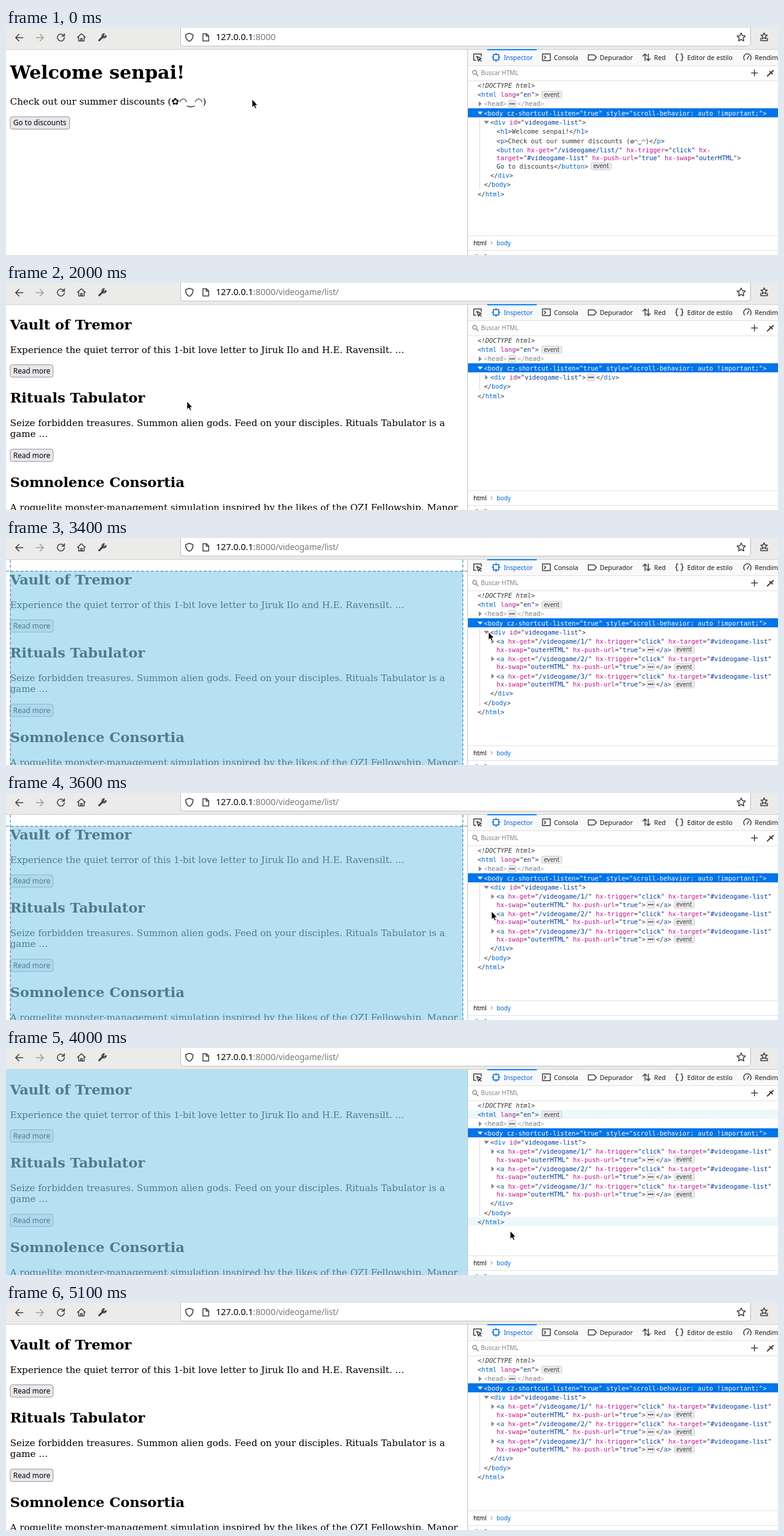
Write an HTML page that moves like this. It is 1280x376 px and loops after 5700 ms.

```html
<!DOCTYPE html>
<html lang="en">
<head>
<meta charset="utf-8">
<title>Browser with inspector</title>
<style>
  html, body { margin: 0; width: 100%; height: 100%; overflow: hidden; background: #fff; }
  svg { display: block; width: 100%; height: 100%; }
  text { white-space: pre; }
  .page { font-family: "DejaVu Serif", "DejaVu Sans", serif; font-size: 15.3px; }
  .h1 { font-size: 30.6px; font-weight: bold; }
  .h2 { font-size: 22.95px; font-weight: bold; }
  .ui, .button { font-family: "Noto Sans", sans-serif; }
  .button { font-size: 12px; }
  .url { font-size: 14.6px; }
  .path { font-size: 13.6px; }
  .tab { font-size: 10.7px; }
  .small { font-size: 10px; }
  .code { font-family: "DejaVu Sans Mono", monospace; font-size: 10.52px; fill: #38383d; }
  .tag { fill: #0067d1; }
  .attr { fill: #c0128f; }
  .val { fill: #003a9b; }
  .selected, .selected tspan { fill: #fff; }
  .faded { fill: #a0a0a5; }
  .faded tspan { fill: #77777c; }
  .doctype { font-style: italic; }
  .icon { fill: none; stroke: #3c3c43; stroke-width: 1.5; stroke-linejoin: round; stroke-linecap: round; }
  .guide { fill: none; stroke: #2b7ba3; stroke-dasharray: 5 3; }
</style>
</head>
<body>
<svg id="stage" viewBox="0 0 1280 376" preserveAspectRatio="none"></svg>
<script>
const LOOP = 5700;
const ROW = 15.3, WRAP = 13.4, FIRST_ROW = 95, CHAR = 6.333;

const text = (x, y, s, cls = '') => `<text x="${x}" y="${y}" class="${cls}">${s}</text>`;
const rect = (x, y, w, h, fill, more = '') =>
  `<rect x="${x}" y="${y}" width="${w}" height="${h}" fill="${fill}" ${more}/>`;
const icon = (d, style = '') => `<path class="icon" d="${d}" style="${style}"/>`;
const group = (id, content) => `<g id="${id}">${content}</g>`;

// ---- Web page ----
const button = (y, w, label, id = '') =>
  rect(7, y, w, 20.5, '#e9e9ed', `id="${id}" rx="3.5" stroke="#8f8f9d"`) +
  text(12, y + 14.4, label, 'button');

const home = text(6.8, 84, 'Welcome senpai!', 'h1') +
  text(6.8, 127, 'Check out our summer discounts (✿◠‿◠)') +
  button(147, 98.5, 'Go to discounts', 'go');

const list = text(6.8, 76.5, 'Vault of Tremor', 'h2') +
  text(6.8, 115.7, 'Experience the quiet terror of this 1-bit love letter to Jiruk Ilo and H.E. Ravensilt. …') +
  button(135.5, 71, 'Read more') +
  text(6.8, 198.2, 'Rituals Tabulator', 'h2') +
  text(6.8, 237.2, 'Seize forbidden treasures. Summon alien gods. Feed on your disciples. Rituals Tabulator is a') +
  text(6.8, 255.2, 'game …') +
  button(275.2, 71, 'Read more') +
  text(6.8, 338, 'Somnolence Consortia', 'h2') +
  text(6.8, 376.7, 'A roguelite monster-management simulation inspired by the likes of the QZJ Fellowship, Manor');

// ---- Element highlighter ----
const guides = '<path class="guide" d="M0 55H765M7.2 36V376M757.5 36V376"/>';
const content = rect(7, 55, 750.5, 321, '#87ceeb', 'opacity=".6"');
const margins = '<path fill="#edff64" opacity=".6" d="M0 47H765V376H757.5V55H7V376H0Z"/>';
const overlays = {
  body: margins + content + guides,
  div: content + guides,
  html: rect(0, 36, 765, 340, '#87ceeb', 'opacity=".6"')
};

// ---- Browser toolbar ----
const star = (cx, cy, r) => 'M' + Array.from({ length: 10 }, (_, i) => {
  const a = (i * 36 - 90) * Math.PI / 180, d = i % 2 ? r * 0.48 : r;
  return `${(cx + d * Math.cos(a)).toFixed(1)} ${(cy + d * Math.sin(a)).toFixed(1)}`;
}).join('L') + 'Z';

const toolbar = rect(0, 0, 1280, 35, '#ebebea') + rect(0, 35, 1280, 1, '#cfcfd2') +
  rect(289.5, -6, 945, 36, '#fff', 'rx="4" stroke="#bcbcc0"') +
  icon('M28 16H16M21.5 10.5L16 16l5.5 5.5') +
  icon('M50 16H62M56.5 10.5L62 16l-5.5 5.5', 'opacity:.45') +
  icon('M95.6 12.2A5.8 5.8 0 1 0 96.8 16M96.8 9.5V13.5H92.5') +
  icon('M118.5 15.5L125 9.5l6.5 6M120.5 14.5V21.5H129.5V14.5M123.7 21.5V17.5H126.3V21.5') +
  icon('M154.5 20.5L161 14', 'stroke-width:3') +
  icon('M163 9.5a3.5 3.5 0 1 0 3 3l-2.8 1.8-2-2Z') +
  icon('M304 8.8L310 11C310.5 17 307.5 20.5 304 22C300.5 20.5 297.5 17 298 11Z') +
  icon('M326.5 9.5H332.5L336 13V21.5H326.5ZM332 9.5V13.5H336') +
  icon(star(1219, 15.5, 7.3)) +
  icon(star(1257, 13.5, 5.5)) + icon('M1251.5 17V21H1262.5V17') +
  `<g class="ui">${text(348, 20, '127.0.0.1<tspan fill="#77777d">:8000</tspan>', 'url')}` +
  `<g id="path" fill="#77777d">${text(447, 20, '/videogame/list/', 'path')}</g></g>`;

// ---- Developer tools ----
const tab = (x, label, color = '#18181a') => `<g fill="${color}">${text(x, 52.5, label, 'tab')}</g>`;

const panel = rect(765, 36, 515, 340, '#fff') + rect(765, 36, 515, 26, '#f9f9fa') +
  [62, 87, 343.5, 368].map(y => rect(765, y, 515, 1, '#e0e0e2')).join('') +
  rect(765, 36, 1, 340, '#c5c5ca') +
  rect(798, 35, 82, 2, '#0a84ff') +
  icon('M779 53.5H775.5V43H788V47M780.5 47L788 50.5 784.8 51.5 783.5 55ZM785 52L788 55') +
  icon('M808 44H817V53H808ZM812.5 42V44M812.5 53V55.5M806 48.5H808M817 48.5H819', 'stroke:#0067d1') +
  icon('M889.5 43H902.5V54H889.5ZM892.5 46.5L895 48.7 892.5 51') +
  icon('M965.5 44.5H975L979 48.7 975 53H965.5Z') +
  icon('M1059.5 54V43M1056 46.5L1059.5 43 1062.5 46M1065 43V54M1061.8 51L1065 54 1068 51') +
  icon('M1114 43C1109.5 43 1113.5 48 1110.5 48.5C1113.5 49 1109.5 54 1114 54M1119 43C1123.5 43 1119.5 48 1122.5 48.5C1119.5 49 1123.5 54 1119 54') +
  icon('M1224.5 53A6.2 6.2 0 1 1 1234 53M1229 51.5L1231.5 46.5') +
  icon('M1236 74.5H1246M1241 69.5V79.5') +
  icon('M1262.5 79.5L1268 74M1266.5 72L1270.5 76M1269.5 73L1272 70.5', 'stroke-width:2') +
  icon('M780.3 73.5a3.3 3.3 0 1 0 -6.6 0a3.3 3.3 0 1 0 6.6 0M779.5 76L783 79.5', 'stroke:#77777d;stroke-width:1.2') +
  '<g class="ui">' +
  tab(825.5, 'Inspector', '#0060df') + tab(908.5, 'Consola') + tab(984.5, 'Depurador') +
  tab(1074.5, 'Red') + tab(1129.5, 'Editor de estilo') + tab(1241.5, 'Rendimiento') +
  `<g fill="#808086">${text(787.5, 78.3, 'Buscar HTML', 'small')}</g>` +
  text(775, 359.7, 'html', 'small') + `<g fill="#0067d1">${text(813.5, 359.7, 'body', 'small')}</g></g>` +
  icon('M804 353.5L806.5 356 804 358.5', 'stroke-width:1;stroke:#77777d') +
  rect(779, 375, 3, 1, '#77777d') + rect(793, 375, 4, 1, '#77777d');

// ---- Markup tree: "·" is a collapsed badge, "@" an event badge ----
const colorize = s => s.replace(/(<\/?)(\w+)|([\w-]+)="([^"]*)"|(hx-$)|>/g,
  (m, open, tag, attr, val, cut) => {
    if (tag) return `${open.replace('<', '&lt;')}<tspan class="tag">${tag}</tspan>`;
    if (attr) return `<tspan class="attr">${attr}</tspan>="<tspan class="val">${val}</tspan>"`;
    return cut ? `<tspan class="attr">${cut}</tspan>` : '&gt;';
  });

function badge(x, y, w, label) {
  const box = rect(x, y - 5.7, w, 11.6, '#ececef', 'rx="2" stroke="#c4c4ca" stroke-width=".8"');
  return box + (label ? `<g class="ui" fill="#38383d">${text(x + 3.5, y + 3.3, label, 'small')}</g>`
    : [3, 6.2, 9.4].map(dx => `<circle cx="${x + dx}" cy="${y}" r="1.2" fill="#38383d"/>`).join(''));
}

function codeLine(x, y, source, cls) {
  return source.split(/([·@])/).map(part => {
    const start = x;
    if (part === '·') { x += 17.4; return badge(start + 2.5, y, 12.4); }
    if (part === '@') { x += 40; return badge(start + 4.8, y, 33.5, 'event'); }
    x += part.length * CHAR;
    return part && text(start, y + 3.8, colorize(part), 'code ' + cls);
  }).join('');
}

function arrow(x, y, kind, color) {
  const d = kind === 'v' ? 'm-4.3 -2.5h8.6l-4.3 5.2Z' : 'm-2.3 -4.3v8.6l4.8 -4.3Z';
  return `<path fill="${color}" d="M${x} ${y}${d}"/>`;
}

const rowBand = (y, color) => rect(766, Math.round(y - 7.9), 514, 15, color);

// Each row: [depth, arrow, lines, class]
const head = [
  [0, '', ['&lt;!DOCTYPE html>'], 'doctype'],
  [0, '', ['<html lang="en">@']],
  [1, '>', ['<head>·</head>'], 'faded'],
  [1, 'v', ['<body cz-shortcut-listen="true" style="scroll-behavior: auto !important;">'], 'selected']
];
const tail = [[1, '', ['</body>']], [0, '', ['</html>']]];

function tree(rows) {
  let y = FIRST_ROW, out = '', lineEnd = 0;
  for (const [depth, kind, lines, cls = ''] of [...head, ...rows, ...tail]) {
    const x = 782 + depth * 10.45;
    if (cls === 'selected') out += rowBand(y, '#0074e8');
    if (kind) out += arrow(x - 6.3, y, kind, cls === 'selected' ? '#fff' : '#85858b');
    lines.forEach((line, i) => out += codeLine(x, y + i * WRAP, line, cls));
    y += (lines.length - 1) * WRAP + ROW;
    if (depth) lineEnd = y - 9;
  }
  return rect(785, 149, 1, lineEnd - 149, '#d9d9dd') + out;
}

const openDiv = [2, 'v', ['<div id="videogame-list">']], closeDiv = [2, '', ['</div>']];
const trees = {
  home: tree([openDiv,
    [3, '', ['<h1>Welcome senpai!</h1>']],
    [3, '', ['<p>Check out our summer discounts (✿◠‿◠)</p>']],
    [3, '', ['<button hx-get="/videogame/list/" hx-trigger="click" hx-',
      'target="#videogame-list" hx-push-url="true" hx-swap="outerHTML">',
      'Go to discounts</button>@']],
    closeDiv]),
  folded: tree([[2, '>', ['<div id="videogame-list">·</div>']]]),
  open: tree([openDiv,
    ...[1, 2, 3].map(n => [3, '>', [
      `<a hx-get="/videogame/${n}/" hx-trigger="click" hx-target="#videogame-list"`,
      'hx-swap="outerHTML" hx-push-url="true">·</a>@']]),
    closeDiv])
};
const hoverRows = { body: [171.5], div: [156.2], html: [110.3, 288.2] };

const groups = (prefix, map, render = x => x) =>
  Object.entries(map).map(([key, value]) => group(`${prefix}-${key}`, render(value))).join('');

document.getElementById('stage').innerHTML =
  rect(0, 0, 1280, 376, '#fff') +
  `<g class="page">${groups('page', { home, list })}</g>` +
  groups('overlay', overlays) + toolbar + panel +
  groups('hover', hoverRows, ys => ys.map(y => rowBand(y, '#edf8fb')).join('')) +
  groups('tree', trees) +
  '<path id="cursor" fill="#000" stroke="#fff" stroke-width=".9" d="M0 0V13.5L3 10.8 5.2 15.4 7.4 14.4 5.3 10H9.3Z"/>';

// ---- Timeline: [start in ms, value...], each held until the next ----
const cursorSteps = [
  [0, 408, 118], [300, 400, 123], [400, 391.5, 127],
  [600, 330, 139], [700, 205, 158], [800, 104, 169], [900, 78, 165],
  [2000, 300, 196], [2100, 640, 215],
  [2300, 836.5, 147], [2400, 823, 150], [2500, 812, 153], [2600, 804, 155], [2700, 800, 155.5],
  [3500, 801, 166], [3600, 805, 196], [3700, 811, 241], [3800, 818.5, 273],
  [3900, 823, 287], [4000, 836, 303], [4100, 860, 319], [4200, 885, 331], [4300, 903, 336], [4400, 911, 335],
  [4800, 907, 333], [4900, 900.5, 330.5], [5000, 888, 362], [5100, -50, -50]
];
const pageSteps = [[0, 'home'], [1600, 'list']];
const treeSteps = [[0, 'home'], [2000, 'folded'], [3400, 'open']];
const overlaySteps = [[0, ''], [2300, 'body'], [2500, 'div'], [3800, 'html'], [4900, '']];
const hoverSteps = [[0, ''], [2300, 'body'], [2500, 'div'], [3400, ''], [3800, 'html'], [5100, '']];
const buttonSteps = [[0, '#e9e9ed', '#8f8f9d'], [900, '#d0d0d7', '#676774'], [1500, '#b1b1b9', '#484851']];

const at = (steps, t) => steps.findLast(step => step[0] <= t).slice(1);
const show = (id, visible) => document.getElementById(id).style.display = visible ? '' : 'none';

function choose(prefix, map, steps, t) {
  const [current] = at(steps, t);
  for (const key in map) show(`${prefix}-${key}`, key === current);
}

function draw(now) {
  const t = now % LOOP;
  choose('page', { home, list }, pageSteps, t);
  choose('tree', trees, treeSteps, t);
  choose('overlay', overlays, overlaySteps, t);
  choose('hover', hoverRows, hoverSteps, t);
  show('path', at(pageSteps, t)[0] === 'list');

  const [fill, stroke] = at(buttonSteps, t);
  const go = document.getElementById('go');
  go.setAttribute('fill', fill);
  go.setAttribute('stroke', stroke);

  const [x, y] = at(cursorSteps, t);
  document.getElementById('cursor').setAttribute('transform', `translate(${x} ${y})`);
  requestAnimationFrame(draw);
}
draw(0);
</script>
</body>
</html>
```
